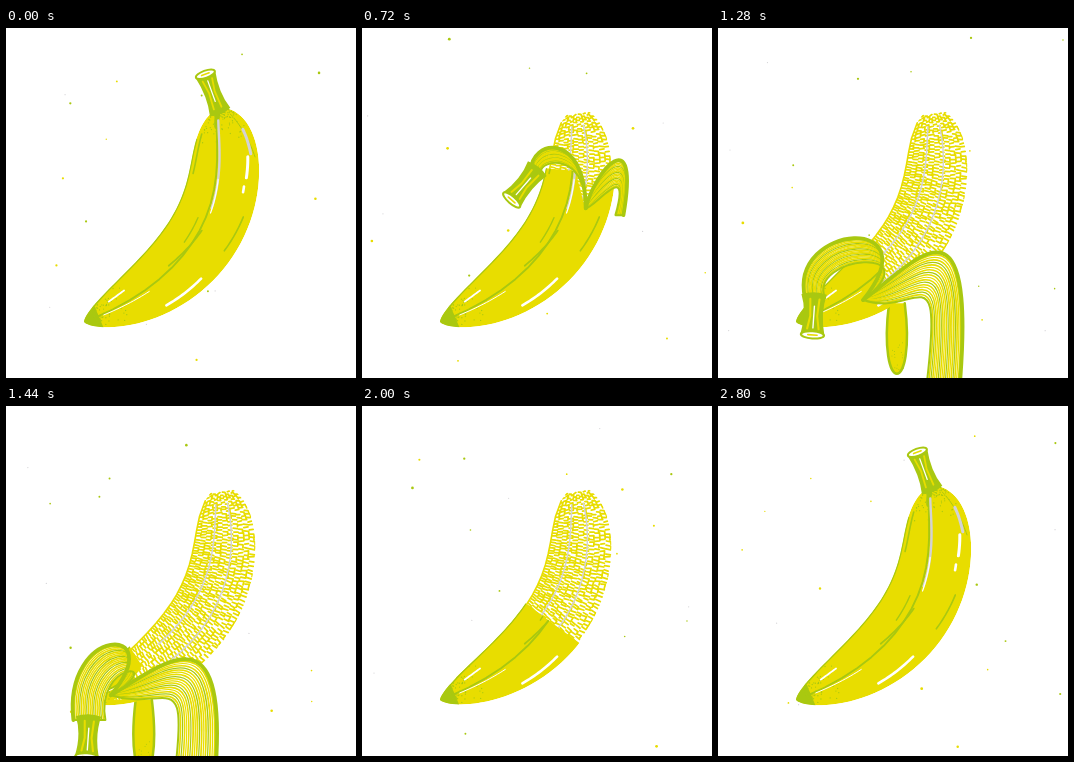
Animation, 350 px wide and 350 px high, one loop 2.88 s. Source, as an HTML page with a canvas:

```html
<!DOCTYPE html>
<html lang="en">
<head>
<meta charset="utf-8">
<title>Banana</title>
<style>
  html, body { margin: 0; width: 100%; height: 100%; overflow: hidden; background: #fff; }
  canvas { display: block; width: 350px; height: 350px; }
</style>
</head>
<body>
<canvas id="stage" width="350" height="350"></canvas>
<script>
const ctx = document.getElementById('stage').getContext('2d');
const STEP = 80, COUNT = 36;
const YELLOW = '#e8dd00', GREEN = '#a9c810', GRAY = '#d3d2d5', WHITE = '#fff';

const mix = (a, b, k) => a + (b - a) * k;
const mixAll = (a, b, k) => a.map((v, i) => mix(v, b[i], k));
const clamp = k => Math.max(0, Math.min(1, k));
const progress = (t, from, to) => clamp((t - from) / (to - from));

function random(seed) {
  let s = seed * 7919 + 17;
  return () => {
    s = (s + 0x6d2b79f5) | 0;
    let r = Math.imul(s ^ (s >>> 15), 1 | s);
    r = (r + Math.imul(r ^ (r >>> 7), 61 | r)) ^ r;
    return ((r ^ (r >>> 14)) >>> 0) / 4294967296;
  };
}

// The banana is a bent axis (u = 0 at the neck, 1 at the tip) with a width along it
const AXIS = [[214, 80], [236, 180], [190, 252], [78, 294]];

// Point at u, moved sideways by some pixels
function spot(u, side) {
  const w = 1 - u, [a, b, c, d] = AXIS;
  const at = i => w * w * w * a[i] + 3 * w * w * u * b[i] + 3 * w * u * u * c[i] + u * u * u * d[i];
  const slope = i => w * w * (b[i] - a[i]) + 2 * w * u * (c[i] - b[i]) + u * u * (d[i] - c[i]);
  const dx = slope(0), dy = slope(1), len = Math.hypot(dx, dy);
  return [at(0) + side * dy / len, at(1) - side * dx / len];
}

const halfWidth = u => (34 + 8 * u) * (1 - (1 - u) ** 12) ** 0.6 * (1 - u ** 4) ** 0.7;

// Point at u, with v from -1 (left edge) to 1 (right edge)
const place = (u, v, size = 1) => spot(u, v * size * halfWidth(u));

function trace(points, closed = false) {
  const path = new Path2D();
  for (const p of points) path.lineTo(...p);
  if (closed) path.closePath();
  return path;
}

function sample(n, point) {
  return Array.from({ length: n + 1 }, (_, i) => point(i / n));
}

function outline(size, top = 0) {
  const edge = side => sample(60, k => place(mix(top, 1, k * k * (3 - 2 * k)), side, size));
  return trace([...edge(-1), ...edge(1).reverse()], true);
}

// Everything below a cut across the banana, optionally with a notch in it
function below(cut, notch = 0) {
  const side = px => sample(12, k => spot(mix(cut, 1.15, k), px));
  return trace([...side(-60).reverse(), spot(cut, -5), spot(cut + notch, 12),
    spot(cut + notch * 0.4, 20), ...side(60)], true);
}

function stroke(path, color, width) {
  ctx.strokeStyle = color;
  ctx.lineWidth = width;
  ctx.stroke(path);
}

function fill(path, color) {
  ctx.fillStyle = color;
  ctx.fill(path);
}

function dot(x, y, r, color) {
  ctx.fillStyle = color;
  ctx.beginPath();
  ctx.arc(x, y, r, 0, 7);
  ctx.fill();
}

function mark(u0, u1, v0, v1, color, width) {
  stroke(trace(sample(16, k => place(mix(u0, u1, k), mix(v0, v1, k)))), color, width);
}

function drawSpecks(frame) {
  const rnd = random(frame + 3);
  for (let i = 0; i < 25; i++) {
    const x = (i % 5 + rnd()) * 68 + 5, y = (Math.floor(i / 5) + rnd()) * 67 + 8;
    const tone = rnd(), keep = rnd() < 0.75, r = 0.7 + rnd() * 0.7;
    if (keep) dot(x, y, tone < 0.2 ? 0.6 : r, tone < 0.2 ? GRAY : tone < 0.7 ? YELLOW : GREEN);
  }
}

const COB = 0.89, cobShape = outline(COB, 0.015), kernels = makeKernels();

function makeKernels() {
  const path = new Path2D(), rnd = random(50), columns = 11, rows = 74;
  for (let c = 0; c < columns; c++) {
    const across = k => (c + k) / columns * 2 - 1;
    for (let r = 0; r < rows; r++) {
      const u = mix(0.02, 0.985, (r + rnd() * 0.4 + c % 2 / 2) / rows);
      const from = across(rnd() * 0.12), to = across(0.75 + rnd() * 0.2);
      path.moveTo(...place(u, from, COB));
      path.lineTo(...place(u + (rnd() - 0.5) * 0.006, to, COB));
      if (rnd() < 0.35) path.lineTo(...place(u + 0.01, to, COB));
    }
  }
  return path;
}

function drawCob() {
  fill(cobShape, WHITE);
  ctx.save();
  ctx.clip(cobShape);
  stroke(kernels, YELLOW, 1.75);
  for (const v of [-0.4, 0.22]) mark(0.06, 0.7, v * 0.8, v, GRAY, 1.5);
  ctx.restore();
  mark(0.04, 0.93, -COB, -COB, YELLOW, 1.6);
}

function drawSkin(size, clip) {
  const shape = outline(size), rnd = random(9);
  ctx.save();
  ctx.clip(clip);
  ctx.clip(shape);
  fill(shape, YELLOW);

  // Green tip and stippled ends
  fill(below(0.955), GREEN);
  for (let i = 0; i < 200; i++) {
    const d = rnd() * rnd(), v = rnd() * 1.8 - 0.9;
    dot(...(i % 3 ? place(d * 0.14, v) : place(0.97 - d * 0.13, v)), 0.65, GREEN);
  }

  mark(0.1, 0.96, -size, -size, GREEN, 2.4);
  mark(0, 0.06, -0.3, -0.28, GREEN, 5);
  mark(0, 0.97, -0.3, 0, GREEN, 1.9);
  mark(0.04, 0.38, -0.21, -0.12, GRAY, 2.4);
  mark(0.26, 0.4, -0.15, -0.1, WHITE, 1.2);
  mark(0.44, 0.56, -0.36, -0.32, GREEN, 1.4);
  mark(0.48, 0.67, -0.1, -0.2, GREEN, 1.8);
  mark(0.08, 0.25, -0.85, -0.88, GREEN, 1.6);
  mark(0.37, 0.5, 0.78, 0.72, GREEN, 1.6);
  mark(0.04, 0.17, 0.6, 0.9, GREEN, 1);
  mark(0.08, 0.16, 0.72, 0.78, GRAY, 3);
  mark(0.17, 0.24, 0.68, 0.64, WHITE, 3);
  mark(0.27, 0.29, 0.6, 0.6, WHITE, 2.6);
  mark(0.62, 0.76, 0.72, 0.76, WHITE, 2.6);
  mark(0.85, 0.91, -0.5, -0.5, WHITE, 1.8);
  mark(0.78, 0.94, 0.06, 0.06, WHITE, 1);
  ctx.restore();
}

// Folded peels: outer edge from the tip over two handles, then how far the inner edge lies from it
const POSE_TIMES = [400, 960, 1280, 1680];
const LEFT = [
  [206, 88, 208, 78, 222, 72, 2, 6],
  [141, 186, 138, 135, 225, 125, 16, 32],
  [87, 270, 70, 195, 215, 185, 20, 32],
  [38, 380, 36, 255, 90, 265, 50, 42]
];
const RIGHT = [
  [258, 90, 246, 82, 234, 95, 0, 8],
  [264, 260, 302, 98, 232, 178, -14, 60],
  [240, 378, 262, 150, 200, 232, -34, 60],
  [160, 390, 172, 268, 105, 290, -52, 42]
];

function pose(list, t) {
  let i = 0;
  while (i < 2 && t >= POSE_TIMES[i + 1]) i++;
  return mixAll(list[i], list[i + 1], progress(t, POSE_TIMES[i], POSE_TIMES[i + 1]));
}

function drawFlap([x, y, ax, ay, bx, by, dx, dy], root) {
  const outer = [x, y, ax, ay, bx, by, ...root];
  const inner = [x + dx, y, ax + dx, ay + dy, bx, by + dy, ...root];
  const arc = k => {
    const [px, py, ...rest] = mixAll(outer, inner, k), path = new Path2D();
    path.moveTo(px, py);
    path.bezierCurveTo(...rest);
    return path;
  };
  const shape = arc(0);
  shape.bezierCurveTo(bx, by + dy, ax + dx, ay + dy, x + dx, y);
  shape.closePath();
  fill(shape, WHITE);
  ctx.save();
  ctx.clip(shape);
  const n = 18;
  for (let i = 1; i < n; i++) stroke(arc(i / n), i % 4 ? YELLOW : GREEN, i % 2 ? 1.6 : 1.2);
  ctx.restore();
  stroke(shape, GREEN, 2);
  stroke(arc(0), GREEN, 3.8);
}

// Middle peel, upright at first and then hanging
function drawTab(peel) {
  const [x, y] = place(Math.min(0.93, peel + 0.05), mix(0.1, 1, clamp(peel * 3)));
  const len = Math.min(75, 160 * peel - 35), w = 6 + Math.abs(len) * 0.1;
  const path = new Path2D();
  path.moveTo(x - w * 0.6, y);
  path.bezierCurveTo(x - w * 1.5, y + len * 1.33, x + w * 1.5, y + len * 1.33, x + w * 0.6, y);
  fill(path, YELLOW);
  stroke(path, GREEN, 2.5);
  const rnd = random(4);
  for (let i = 0; i < 18; i++) {
    dot(x + (rnd() - 0.5) * w, y + len * mix(0.5, 0.95, rnd()), 0.5, GREEN);
  }
}

function drawStem(x, y, degrees, width = 1, length = 1) {
  ctx.save();
  ctx.translate(x, y);
  ctx.rotate(degrees * Math.PI / 180);
  ctx.scale(width, length);
  const shape = new Path2D('M-10 4Q-5.5 -15 -10.5 -37L10.5 -37Q6 -15 12 3Q0 8 -10 4Z');
  fill(shape, GREEN);
  for (const side of [-1, 1]) {
    stroke(trace([[side * 4, -1], [side * 3, -18], [side * 5, -31]]), YELLOW, 1.8);
  }
  stroke(trace([[0, -8], [0, -30]]), WHITE, 1.2);
  const cut = new Path2D();
  cut.ellipse(0, -37, 10, 3.6, 0, 0, 7);
  fill(cut, WHITE);
  stroke(cut, GREEN, 2);
  stroke(trace([[-4, -37], [4, -37]]), YELLOW, 1.6);
  ctx.restore();
}

function drawPeeling(t) {
  const bend = progress(t, 0, 400), fold = progress(t, 400, 960);
  const peel = bend < 1 ? mix(-0.15, 0.03, bend) : mix(0.03, 1, progress(t, 400, 1680) ** 1.15);
  const root = place(Math.min(0.93, peel + 0.13), 0.35);
  const left = pose(LEFT, t), fall = Math.max(0, t - 1680) * 0.6;
  const open = t >= 240;

  if (bend > 0) drawCob();
  ctx.save();
  ctx.translate(0, fall);
  if (open) drawTab(peel);
  drawSkin(1, below(peel, 0.13));
  if (open) {
    drawFlap(pose(RIGHT, t), root);
    drawFlap(left, root);
  }
  drawStem(mix(212, left[0] + left[6] / 2, bend), mix(81, left[1], bend),
    -20 - 70 * bend - 86 * fold, 1 + 0.15 * fold);
  ctx.restore();
}

function drawRegrowing(t) {
  const cover = progress(t, 1840, 2240), grow = progress(t, 2320, 2640);
  if (cover < 1) drawCob();
  if (cover > 0) drawSkin(mix(0.93, 1, grow), below(mix(1, -0.15, cover)));
  if (grow > 0) drawStem(212, 81, -20, grow, grow);
}

function draw(frame) {
  const t = frame * STEP;
  ctx.fillStyle = WHITE;
  ctx.fillRect(0, 0, 350, 350);
  ctx.lineCap = ctx.lineJoin = 'round';
  drawSpecks(frame);
  if (t < 1840) drawPeeling(t);
  else drawRegrowing(t);
}

let shown = -1;
function tick() {
  const frame = Math.floor(performance.now() / STEP) % COUNT;
  if (frame !== shown) draw(shown = frame);
  requestAnimationFrame(tick);
}
tick();
</script>
</body>
</html>
```
